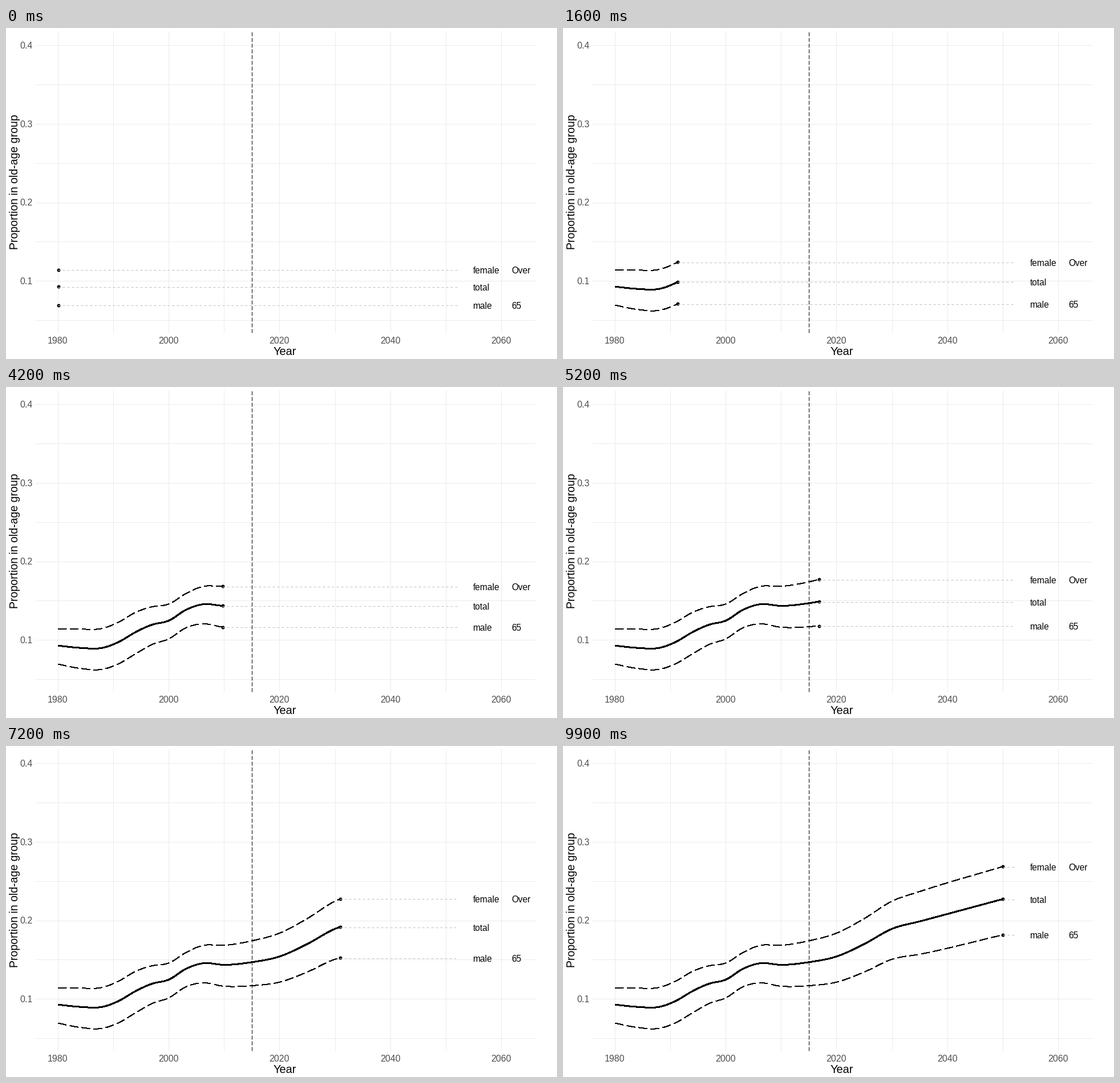
Write a matplotlib script that moves like this. It is 966 px wide and 580 px high and loops after 10000 ms.

```python
import matplotlib.pyplot as plt
import numpy as np
from matplotlib.animation import FuncAnimation

W, H = 966, 580
FRAMES, INTERVAL = 100, 100
START, END = 1980, 2050
LEFT, RIGHT, TOP, BOTTOM = 51, 928, 5, 534

plt.rcParams.update({
    "font.family": "Liberation Sans",
    "text.hinting": "native",
    "lines.scale_dashes": False,
    "lines.dash_capstyle": "butt",
    "lines.solid_capstyle": "butt",
    "toolbar": "None",
})


def px(year):
    return 91.5 + 9.71 * (np.asarray(year) - START)


def py(share):
    return 442.8 - (np.asarray(share) - 0.1) * 1377


def smooth(x, knots, values):
    """Cubic Hermite curve through a few key points."""
    k, v = np.array(knots, float), np.array(values, float)
    slope = np.gradient(v, k)
    i = np.clip(np.searchsorted(k, x, side="right") - 1, 0, len(k) - 2)
    step = k[i + 1] - k[i]
    t = (x - k[i]) / step
    return (v[i] + t * t * (3 - 2 * t) * (v[i + 1] - v[i])
            + step * t * (1 - t) * ((1 - t) * slope[i] - t * slope[i + 1]))


# Key points of the total share and of the women's lead over it, in percent.
# Men lie a tenth further below the total than women lie above it.
KEYS = [1980, 1984, 1988, 1991, 1994, 1997, 2000, 2003,
        2006, 2010, 2015, 2020, 2025, 2030, 2035, 2050]
TOTAL = [9.24, 8.96, 8.96, 9.74, 10.98, 11.92, 12.43, 13.78,
         14.5, 14.31, 14.65, 15.38, 16.97, 18.9, 19.84, 22.68]
LEAD = [2.14, 2.38, 2.48, 2.52, 2.51, 2.28, 2.11, 2.07,
        2.26, 2.48, 2.72, 2.97, 3.24, 3.52, 3.8, 4.14]

years = np.linspace(START, END, FRAMES)
total = smooth(years, KEYS, TOTAL) / 100
lead = smooth(years, KEYS, LEAD) / 100

fig = plt.figure(figsize=(W / 72, H / 72), dpi=72, facecolor="white")
ax = fig.add_axes([0, 0, 1, 1])
ax.set_xlim(0, W)
ax.set_ylim(H, 0)
ax.axis("off")


def vrule(x, y0, y1, **style):
    # Half-pixel shift makes line snapping land on the pixel holding x.
    return ax.plot([x - 0.5] * 2, [y0, y1], lw=1, **style)[0]


def hrule(y, x0, x1, **style):
    return ax.plot([x0, x1], [y + 0.5] * 2, lw=1, **style)[0]


def label(x, y, text, size, **style):
    return ax.text(x, y, text, fontsize=size, va="baseline", **style)


# Grid and axes
GRID, TICK = "#EBEBEB", "#4D4D4D"
for year in range(1980, 2061, 10):
    vrule(px(year), TOP, BOTTOM, color=GRID, zorder=1)
    if year % 20 == 0:
        label(px(year) - 0.5, 553, str(year), 16, color=TICK, ha="center")
for i in range(1, 9):
    y = py(i / 20)
    hrule(y, LEFT, RIGHT, color=GRID, zorder=1)
    if i % 2 == 0:
        label(46.7, y + 6.3, f"{i / 20:.1f}", 16, color=TICK, ha="right")
label(488.5, 573, "Year", 20, ha="center")
label(21, 269.5, "Proportion in old-age group", 19.5, ha="center",
      rotation=90, rotation_mode="anchor")
vrule(px(2015), BOTTOM, TOP, color="black", linestyle=(0, (7, 3)), zorder=6)


class Series:
    def __init__(self, name, share, note="", solid=False):
        self.x, self.y = px(years), py(share)
        # Hard-edged strokes cover about one pixel more than their width.
        self.line, = ax.plot([], [], color="black", lw=2 if solid else 1,
                             linestyle="-" if solid else (0, (14, 6)),
                             antialiased=False, zorder=3)
        self.dot, = ax.plot([], [], "o", color="black", ms=6, mew=0,
                            antialiased=False, zorder=4)
        self.guide = hrule(0, 0, 0, color="#BEBEBE",
                           linestyle=(0, (4, 4)), zorder=5)
        self.texts = [label(819, 0, name, 15.5),
                      label(886.5, 0, note, 15.5)]

    def show(self, n):
        x, y = self.x[n], self.y[n]
        self.line.set_data(self.x[:n + 1], self.y[:n + 1])
        self.dot.set_data([x], [y])
        self.guide.set_data([x - 0.5, px(2052)], [y + 0.5] * 2)
        for text in self.texts:
            text.set_y(y + 6.5)


series = [Series("female", total + lead, "Over"),
          Series("total", total, solid=True),
          Series("male", total - 1.1 * lead, "65")]


def update(n):
    for s in series:
        s.show(n)
    return []


anim = FuncAnimation(fig, update, frames=FRAMES, interval=INTERVAL,
                     repeat=True, repeat_delay=0, blit=False)
plt.show()
```
